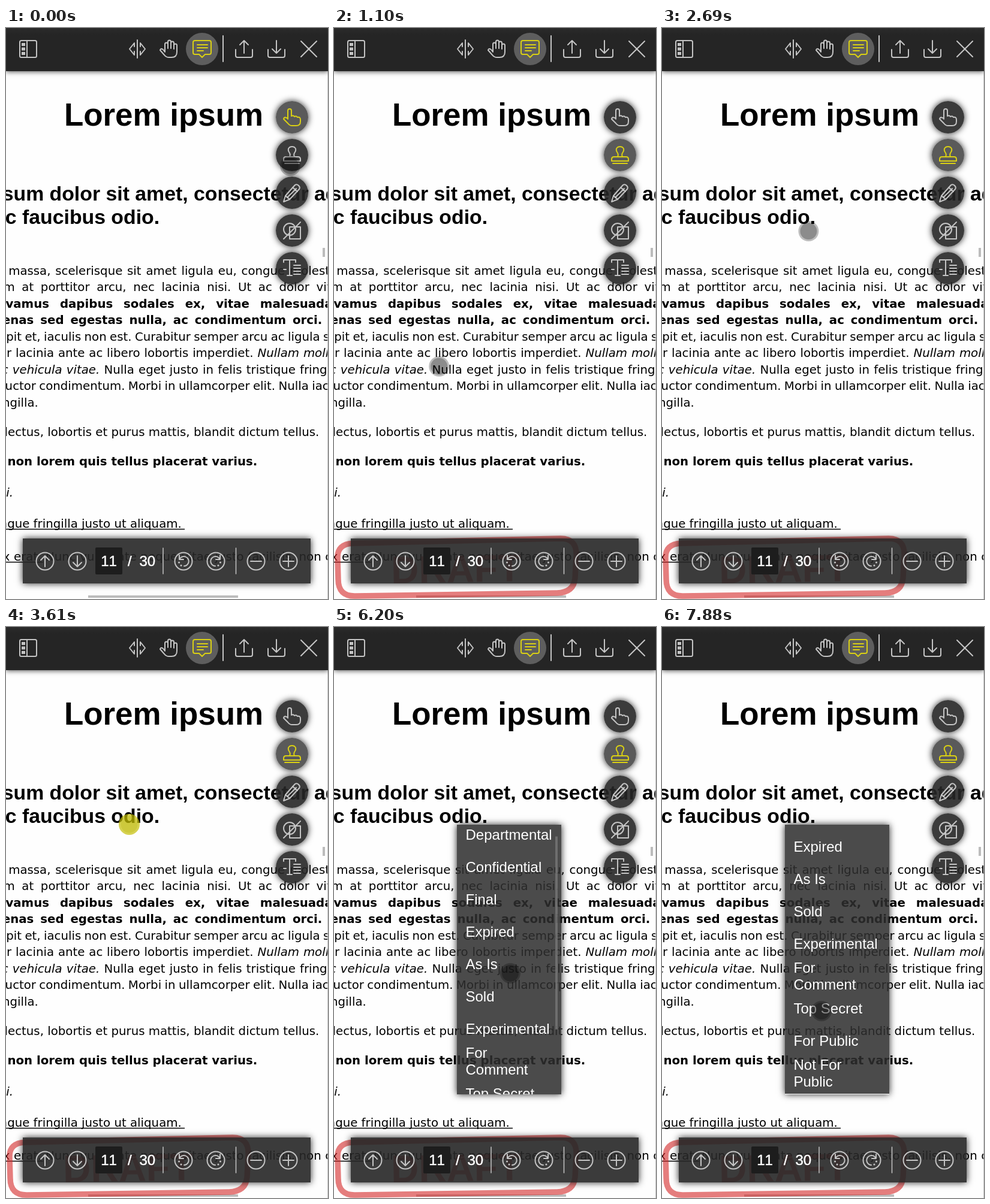
These frames come from a looping animation (537x953 px, 8 s). An HTML page:

```html
<!DOCTYPE html>
<html lang="en">
<head>
<meta charset="utf-8">
<title>Document viewer</title>
<style>
html, body { margin: 0; width: 100%; height: 100%; overflow: hidden; background: #fefefe; }
svg, div { position: absolute; }
body > svg { left: 0; top: 0; }
svg text { white-space: pre; }
#page { font: 19.75px "DejaVu Sans", sans-serif; }
#page .h { font: bold 33.8px "Liberation Sans", Arial, sans-serif; }
#page .title { font-size: 52.9px; }
.b { font-weight: bold; }
.i { font-style: italic; }
.panel { background: rgba(38,38,38,.9); box-shadow: 0 0 11px rgba(0,0,0,.85); }
#top { left: 0; top: 0; width: 537px; height: 72px; background: linear-gradient(#2b2b2b, #252525 15%); box-shadow: 0 1px 8px rgba(0,0,0,.7); }
#nav { left: 28px; top: 852px; width: 480px; height: 75px; }
.round { left: 450px; width: 54px; height: 54px; border-radius: 50%; }
.round.on { background: rgba(82,82,82,.95); }
#menu { left: 205px; top: 330px; width: 174px; height: 450px; background: rgba(46,46,46,.86); }
#menu text, #icons text { font: 24px "Liberation Sans", Arial, sans-serif; fill: #fff; }
#icons { color: #c4c4c4; fill: none; stroke: currentColor; stroke-width: 2; stroke-linecap: round; stroke-linejoin: round; }
#icons text { stroke: #fff; stroke-width: .5; font-kerning: none; }
#icons .on { color: #d9cf14; }
.solid { fill: currentColor; stroke: none; }
</style>
</head>
<body>
<svg id="page" width="537" height="953">
  <text class="h title" x="96.9" y="163">Lorem ipsum</text>
  <text class="h" x="-6.3" y="288">sum dolor sit amet, consectetur adipiscing</text>
  <text class="h" x="-1.2" y="326.5">c faucibus odio.</text>
  <g id="lines"></g>
  <path d="M0 836.5H298M0 891.5H62" stroke="#000" stroke-width="1.3"/>
  <path d="M536.5 72V953" stroke="#c4c4c4"/>
  <path d="M528 367h4v15h-4zM137 947h250v4H137z" fill="#bcbcbc"/>
  <g id="draft" opacity=".6">
    <path d="M32 860L378 852Q405 852 404 880L402 918Q400 942 372 943L36 948Q7 949 7 920L6 885Q5 861 32 860Z" fill="none" stroke="#d62828" stroke-width="9.5"/>
    <text x="95" y="925" transform="rotate(-1 200 900)" style="font:bold 64px 'Liberation Sans',Arial,sans-serif" fill="#d62828">DRAFT</text>
  </g>
</svg>
<div id="top"></div>
<div id="nav" class="panel"></div>
<div id="menu" class="panel">
  <svg width="174" height="450">
    <rect id="thumb" x="164" width="4" height="322" fill="#777"/>
    <g id="list"></g>
    <path id="edge" d="M0 449.5H174" stroke="#fff"/>
  </svg>
</div>
<svg id="icons" width="537" height="953">
  <!-- top bar -->
  <rect x="23" y="21" width="28" height="28" rx="2.5"/>
  <path d="M35 21V49"/>
  <path class="solid" d="M26 25h6v5h-6zM26 32.5h6v5h-6zM26 40h6v5h-6z"/>
  <path d="M219 20V50M214 31V25L206 35L214 45V39M224 31V25L232 35L224 45V39"/>
  <path d="M265 40V27q0-2.5 2.5-2.5t2.5 2.5v7V23q0-2.5 2.5-2.5t2.500 2.5v11V25q0-2.5 2.5-2.5t2.5 2.5v10V29q0-2.500 2.5-2.5t2.5 2.5v11q0 9-9 9h-4q-5 0-8-4l-7-8q1-4 5-1z"/>
  <circle cx="327" cy="35" r="27" fill="#5e5e5e" stroke="none"/>
  <g class="on"><path d="M315 21H339q3 0 3 3V41q0 3-3 3H332l-5 5l-5-5H315q-3 0-3-3V24q0-3 3-3zM319 28H336M319 33H336M319 38H329"/></g>
  <path d="M362 13V56M383 36V46q0 3 3 3H408q3 0 3-3V36M397 42V21M390 28L397 21L404 28"/>
  <path d="M437 36V46q0 3 3 3H462q3 0 3-3V36M451 21V42M444 35L451 42L458 35M492 22L518 48M518 22L492 48"/>
  <!-- side tools -->
  <g id="hand"><path d="M470 152V138q0-3 3-3t3 3v9q3-2 5 1q3-2 5 1q5-1 5 4v3q0 7-7 7H477q-4 0-7-4l-7-7q1-5 7-1z"/></g>
  <g id="stamp"><path d="M473 215q2-4-1-8q-3-5 1-8q4-2 8 0q4 3 1 8q-3 4-1 8M467 215H487q4 0 4 4v3H463v-3q0-4 4-4zM465 226H489"/></g>
  <path d="M463 290l3-10L482 262q3-2 6 1t1 6L473 286zM466 280l7 6M478 266l8 7M469 283L484 268"/>
  <path d="M473 332h18v20H473zM463 352L491 324"/><circle cx="473" cy="336" r="10"/>
  <path d="M463 391V387H483V391M473 387V413M469 413H477M480 396H491M480 401H491M480 406H491M480 411H491M463 403H467"/>
  <!-- navigation bar -->
  <g id="rings"></g>
  <path d="M65 899V881M58 888L65 881L72 888M119 881V899M112 892L119 899L126 892M408 890H426M462 890H480M471 881V899"/>
  <path d="M262 868V911M383.5 868V911" stroke-width="1.5"/>
  <g id="turn"><path d="M289 880V887H296M289.500 886.500A8 8 0 1 1 297 898"/><path d="M288.500 892h.1M292 897h.1" stroke-width="3"/></g>
  <use href="#turn" transform="matrix(-1 0 0 1 646 0)"/>
  <rect x="149" y="867" width="45" height="45" rx="2" fill="#1d1d1d" stroke="none"/>
  <text x="171.500" y="898" text-anchor="middle">11</text>
  <text x="203" y="898">/</text><text x="222.5" y="898">30</text>
</svg>
<svg width="537" height="953"><g id="cursor"><circle id="halo"/><circle id="dot" r="14"/></g></svg>
<script>
const $ = id => document.getElementById(id);

// [x, baseline, extra word space, text, class]
const lines = [
  [4.2, 411.5, 1.5, "massa, scelerisque sit amet ligula eu, congue molestie"],
  [-4.6, 439, 5.4, "m at porttitor arcu, nec lacinia nisi. Ut ac dolor vitae"],
  [-0.6, 466.6, 11, "vamus dapibus sodales ex, vitae malesuada", "b"],
  [-6.2, 494.2, 4, "enas sed egestas nulla, ac condimentum orci.", "b"],
  [0.3, 521.7, -.9, "pit et, iaculis non est. Curabitur semper arcu ac ligula sed"],
  [-11.2, 549.3, .6, "er lacinia ante ac libero lobortis imperdiet. <tspan class='i'>Nullam mollis</tspan>"],
  [-7.2, 576.9, .9, "<tspan class='i'>c vehicula vitae.</tspan> Nulla eget justo in felis tristique fringilla"],
  [-1.4, 604.3, -.9, "uctor condimentum. Morbi in ullamcorper elit. Nulla iaculis"],
  [-6, 631.9, 0, "ngilla."],
  [-2.4, 680.5, 0, "lectus, lobortis et purus mattis, blandit dictum tellus."],
  [2.4, 730.3, 0, "non lorem quis tellus placerat varius.", "b"],
  [0.3, 782, 0, "i.", "i"],
  [-10.4, 834, 0, "ngue fringilla justo ut aliquam."],
  [-5.2, 889, .3, "x erat. Nunc vulputate neque vitae justo facilisis, non consectetur"]
];
$("lines").innerHTML = lines.map(([x, y, gap, text, cls = ""]) =>
  `<text class="${cls}" x="${x}" y="${y}" style="word-spacing:${gap}px">${text}</text>`).join("");

const items = ["Not|Approved", "Departmental", "Confidential", "Final", "Expired", "As Is", "Sold",
  "Experimental", "For|Comment", "Top Secret", "For Public", "Not For|Public"];
$("list").innerHTML = items.map((item, n) => item.split("|").map((row, k, rows) =>
  `<text x="14.5" y="${-10 + n * 54 + (k - (rows.length - 1) / 2) * 28}">${row}</text>`).join("")).join("");

const tools = [122, 185, 248, 311, 374].map(y => {
  const tool = document.createElement("div");
  tool.className = "panel round";
  tool.style.top = y + "px";
  document.body.insertBefore(tool, $("icons"));
  return tool;
});
$("rings").innerHTML = [65, 119, 296, 350, 417, 471].map(x => `<circle cx="${x}" cy="890" r="14.5"/>`).join("");

// [time, x, y]
const path = [[0, 474, 230], [80, 474, 230], [260, 478, 215], [500, 478, 215], [1100, 175, 565],
  [1280, 212, 535], [1380, 212, 528], [2110, 212, 528], [2690, 245, 339], [2860, 146, 360],
  [3050, 146, 360], [3240, 205.5, 329.5], [5560, 205.5, 329.5], [6020, 294, 578], [6200, 294, 578],
  [6760, 294, 557], [6940, 294, 614], [7420, 294, 614], [7690, 263, 652], [7880, 266, 641]];
const scroll = [[6110, 0], [6760, 135], [6940, 161]];

function at(keys, t) {
  const n = keys.findIndex(key => key[0] > t);
  if (n < 0) return keys[keys.length - 1].slice(1);
  if (n === 0) return keys[0].slice(1);
  const a = keys[n - 1], b = keys[n], p = (t - a[0]) / (b[0] - a[0]);
  return a.slice(1).map((v, k) => v + (b[k + 1] - v) * p);
}

function draw(now) {
  const t = now % 8000;
  const stamping = t >= 540;
  const pressed = t >= 260 && t < 540 || t >= 3610 && t < 5180;

  tools[0].classList.toggle("on", !stamping);
  tools[1].classList.toggle("on", stamping);
  $("hand").classList.toggle("on", !stamping);
  $("stamp").classList.toggle("on", stamping);
  $("draft").style.display = stamping ? "" : "none";

  const [shift] = at(scroll, t);
  $("menu").style.display = t >= 5180 ? "" : "none";
  $("list").setAttribute("transform", `translate(0 ${-shift})`);
  $("thumb").setAttribute("y", 6 + shift * .72);
  $("thumb").style.opacity = t < 7120 ? .8 : t < 7320 ? .5 : 0;
  $("edge").style.opacity = t < 7320 ? 0 : 1;

  const [x, y] = at(path, t);
  $("cursor").setAttribute("transform", `translate(${x} ${y})`);
  $("halo").setAttribute("r", pressed ? 17.5 : 17);
  $("halo").setAttribute("fill", pressed ? "rgba(196,190,0,.68)" : "rgba(0,0,0,.26)");
  $("dot").setAttribute("fill", pressed ? "rgba(180,174,0,.25)" : "rgba(0,0,0,.26)");
  requestAnimationFrame(draw);
}
requestAnimationFrame(draw);
</script>
</body>
</html>
```
